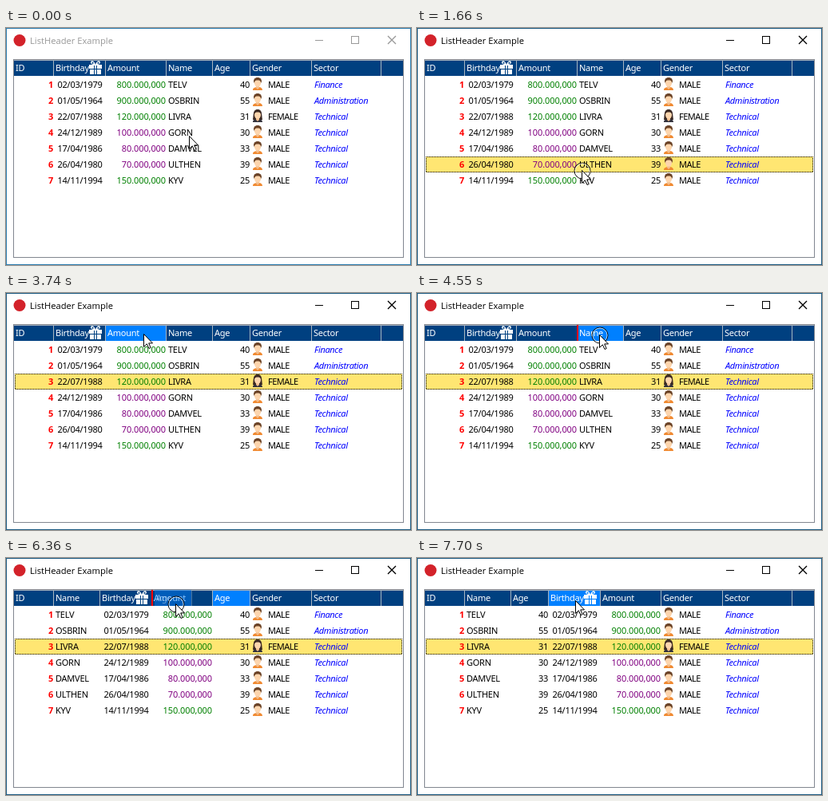
An HTML page with a canvas that plays this animation: 507x297 px, repeating every 8 s.

```html
<!DOCTYPE html>
<html lang="en">
<head>
<meta charset="utf-8">
<title>ListHeader Example</title>
<style>
html, body { margin: 0; width: 100%; height: 100%; overflow: hidden; background: #fff; }
canvas { display: block; }
</style>
</head>
<body>
<canvas id="stage" width="507" height="297"></canvas>
<script>
const ctx = document.getElementById('stage').getContext('2d');
const LOOP = 8000, STEP = 100;
const LEFT = 10, HEADER_TOP = 40, ROW_TOP = 61, ROW = 20;
const HEADER = '#004080', HOT = '#0080ff', EDGE = '#a9b4c0';

const widths = { ID: 50, Birthday: 65, Amount: 76, Name: 58, Age: 47, Gender: 77, Sector: 87 };
const people = [
  ['02/03/1979', 800, 'TELV', 40, 'MALE', 'Finance'],
  ['01/05/1964', 900, 'OSBRIN', 55, 'MALE', 'Administration'],
  ['22/07/1988', 120, 'LIVRA', 31, 'FEMALE', 'Technical'],
  ['24/12/1989', 100, 'GORN', 30, 'MALE', 'Technical'],
  ['17/04/1986', 80, 'DAMVEL', 33, 'MALE', 'Technical'],
  ['26/04/1980', 70, 'ULTHEN', 39, 'MALE', 'Technical'],
  ['14/11/1994', 150, 'KYV', 25, 'MALE', 'Technical']
];

// Pointer script: the rest of the state follows from these actions
const wait = ms => ({ ms });
const move = (ms, x, y) => ({ ms, x, y });
const press = { ms: 0, act: pressAt };
const release = { ms: 0, act: releaseAt };
const click = [press, wait(100), release];
const script = [
  // select rows
  wait(250), move(400, 198, 101), wait(200), ...click,
  wait(100), move(600, 206, 178), ...click,
  move(400, 205, 110), ...click,
  // look over the header
  move(400, 117, 48), wait(300), move(200, 119, 48), wait(100), move(900, 238, 54),
  // drag Name to the left
  move(300, 231, 53), press, move(100, 228, 52), move(400, 88, 50), wait(100), release,
  move(200, 119, 66), wait(100),
  // drag Age to the left
  move(500, 285, 57), wait(100), press, move(800, 138, 56), release,
  move(100, 119, 51), wait(100), move(400, 186, 53), wait(200), move(100, 198, 53)
];

function layout(order) {
  const left = {};
  let x = LEFT;
  for (const name of order) {
    left[name] = x;
    x += widths[name];
  }
  return left;
}

function columnAt({ x, y, order }) {
  const left = layout(order);
  const inHeader = y >= HEADER_TOP && y < HEADER_TOP + 20;
  return inHeader && order.find(n => x >= left[n] && x < left[n] + widths[n]);
}

function pressAt(s) {
  s.down = s.active = true;
  const name = columnAt(s);
  if (name) s.grab = { name, x: s.x, y: s.y };
  else s.selected = Math.floor((s.y - ROW_TOP) / ROW);
}

function releaseAt(s) {
  s.down = false;
  if (!s.grab) return;
  const { target, after } = dropSpot(s);
  const name = s.grab.name;
  s.grab = null;
  if (target === name) return;
  s.order = s.order.filter(n => n !== name);
  s.order.splice(s.order.indexOf(target) + after, 0, name);
}

function dropSpot(s) {
  const target = columnAt(s) || s.grab.name;
  const middle = layout(s.order)[target] + widths[target] / 2;
  return { target, after: target !== s.grab.name && s.x > middle ? 1 : 0 };
}

function stateAt(time) {
  const s = { x: 229, y: 135, order: Object.keys(widths), selected: -1 };
  let left = time;
  for (const { ms, x, y, act } of script) {
    if (x) {
      const k = Math.min(1, left / ms);
      s.x = Math.round(s.x + (x - s.x) * k);
      s.y = Math.round(s.y + (y - s.y) * k);
    }
    if (act) act(s);
    left -= ms;
    if (left < 0) break;
  }
  return s;
}

function rect(x, y, w, h, color) {
  ctx.fillStyle = color;
  ctx.fillRect(x, y, w, h);
}

function frame(x, y, w, h, color, dash = []) {
  ctx.strokeStyle = color;
  ctx.lineWidth = 1;
  ctx.setLineDash(dash);
  ctx.lineDashOffset = 0.5;
  ctx.strokeRect(x + 0.5, y + 0.5, w - 1, h - 1);
  ctx.setLineDash([]);
}

function shape(d, fill, stroke, width = 1) {
  const p = new Path2D(d);
  if (fill) { ctx.fillStyle = fill; ctx.fill(p); }
  if (stroke) { ctx.strokeStyle = stroke; ctx.lineWidth = width; ctx.stroke(p); }
}

function oval(x, y, rx, ry, fill, stroke) {
  ctx.beginPath();
  ctx.ellipse(x, y, rx, ry, 0, 0, 7);
  if (fill) { ctx.fillStyle = fill; ctx.fill(); }
  if (stroke) { ctx.strokeStyle = stroke; ctx.lineWidth = 1; ctx.stroke(); }
}

function text(s, x, y, color = '#000', align = 'left', style = '', spacing = -0.25) {
  ctx.font = style + ' 11px "Noto Sans", sans-serif';
  ctx.letterSpacing = spacing + 'px';
  ctx.textAlign = align;
  ctx.fillStyle = color;
  ctx.fillText(s, x, y);
}

function at(x, y, draw) {
  ctx.save();
  ctx.translate(x, y);
  draw();
  ctx.restore();
}

function drawWindow(active) {
  const ink = active ? '#000' : '#999';
  rect(0, 0, 507, 297, '#fff');
  frame(0, 0, 507, 297, active ? '#1b5a82' : '#2b7db0');
  oval(17, 15.5, 7.5, 7.5, '#d3222a');
  ctx.font = '11.2px "Open Sans", sans-serif';
  ctx.letterSpacing = '0px';
  ctx.textAlign = 'left';
  ctx.fillStyle = ink;
  ctx.fillText('ListHeader Example', 30, 20);
  rect(387, 15, 10, 1, ink);
  frame(432, 10, 10, 10, ink);
  shape('M478 10l10 10m0-10l-10 10', null, ink, 1.4);
  frame(9, 39, 489, 249, '#828790');
}

function drawGift(bg) {
  shape('M7.5 5C1 6 1 0 4 .3 6 .5 7.5 3 8 5 8.5 3 10 .5 12 .3 15 0 15 6 8.5 5z', '#fff');
  oval(4.5, 2.8, 1.2, 1, bg);
  oval(11.5, 2.8, 1.2, 1, bg);
  rect(0, 5, 16, 5, '#fff');
  rect(1, 11, 14, 6, '#fff');
  rect(6, 6, 1, 11, bg);
  rect(9, 6, 1, 11, bg);
}

function drawHeaderCell(name, x, y, hot) {
  const bg = hot ? HOT : HEADER;
  rect(x, y, widths[name] - 1, 20, bg);
  rect(x + widths[name] - 1, y, 1, 20, EDGE);
  text(name, x + 2, y + 14, '#fff');
  if (name === 'Birthday') at(x + 44, y + 1, () => drawGift(bg));
}

function drawPerson(female) {
  const hair = female ? '#3b2923' : '#6b4327';
  if (female) shape('M1 13C2 7 1 0 7 0S12 7 13 13z', hair);
  shape('M1 16C1 12.500 4 12.500 7 12S13 12.500 13 16z', female ? '#33323c' : '#f08a32');
  shape('M5 10h4v3l-2 2-2-2z', '#f3bd8c');
  if (!female) oval(7, 4.6, 4.9, 4.6, hair);
  oval(7, 7, 4, 4.8, '#fdd5ad');
  shape('M2.500 6C2 1 5 .500 7 .500S12 1 11.500 6C10.500 4 9 3.500 7 3.500S3.500 4 2.500 6z', hair);
}

function drawCells(i, left) {
  const [date, amount, name, age, gender, sector] = people[i];
  const top = ROW_TOP + ROW * i, y = top + 14;
  text(i + 1, left.ID + 49, y, '#f00', 'right', 'bold');
  text(date, left.Birthday + 32.5, y, '#000', 'center');
  text(amount + '.000,000', left.Amount + 75, y, amount > 100 ? '#008000' : '#800080', 'right', '', -0.1);
  text(name, left.Name + 2, y);
  text(age, left.Age + 46, y, '#000', 'right');
  at(left.Gender + 2, top + 1, () => drawPerson(gender === 'FEMALE'));
  text(gender, left.Gender + 22, y, '#000', 'left', '', -0.5);
  text(sector, left.Sector + 3, y, '#00f', 'left', 'italic', -0.35);
}

function drawPointer(x, y, resize) {
  at(x, y, () => {
    if (resize) {
      shape('M-9 0l5-4.500v3h2v-6h5v6h2v-3l5 4.500-5 4.500v-3h-2v6h-5v-6h-2v3z', '#000', '#fff');
      rect(0, -7, 1, 14, '#fff');
    } else {
      shape('M.5 .5V16.500L4.300 12.800 7 18.500 9.200 17.600 6.700 11.900H11.500z', '#fff', '#000');
    }
  });
}

function drawDrag(s, left) {
  const { name, x, y } = s.grab;
  if (Math.abs(s.x - x) > 4) {
    ctx.globalAlpha = 0.45;
    drawHeaderCell(name, left[name] + s.x - x, HEADER_TOP + s.y - y, true);
    ctx.globalAlpha = 1;
  }
  const { target, after } = dropSpot(s);
  rect(left[target] + after * widths[target] - 1, HEADER_TOP, 2, 20, '#f00');
}

function render(time) {
  // The picture refreshes ten times a second
  const s = stateAt(Math.max(0, Math.round(time / STEP) * STEP - STEP / 2));
  const left = layout(s.order);
  const over = columnAt(s);
  const hot = s.grab ? s.grab.name : over;

  drawWindow(s.active);
  rect(LEFT, HEADER_TOP, 487, 20, HEADER);
  s.order.forEach(name => drawHeaderCell(name, left[name], HEADER_TOP, name === hot));
  rect(LEFT, HEADER_TOP, 487, 1, EDGE);

  if (s.selected >= 0) {
    const top = ROW_TOP + ROW * s.selected;
    rect(11, top, 485, ROW, '#ffe672');
    frame(11, top, 485, ROW, '#000', [1, 1]);
  }
  people.forEach((_, i) => drawCells(i, left));

  if (s.grab) drawDrag(s, left);
  if (s.down) {
    oval(s.x + 1, s.y + 1, 10, 10, null, '#000');
    oval(s.x + 1, s.y + 1, 9, 9, null, 'rgba(255,255,255,.7)');
  }
  const nearEdge = s.order.some(n => Math.abs(left[n] - s.x) < 3);
  drawPointer(s.x, s.y, over && !s.down && nearEdge);
}

function tick() {
  render(performance.now() % LOOP);
  requestAnimationFrame(tick);
}
tick();
</script>
</body>
</html>
```
